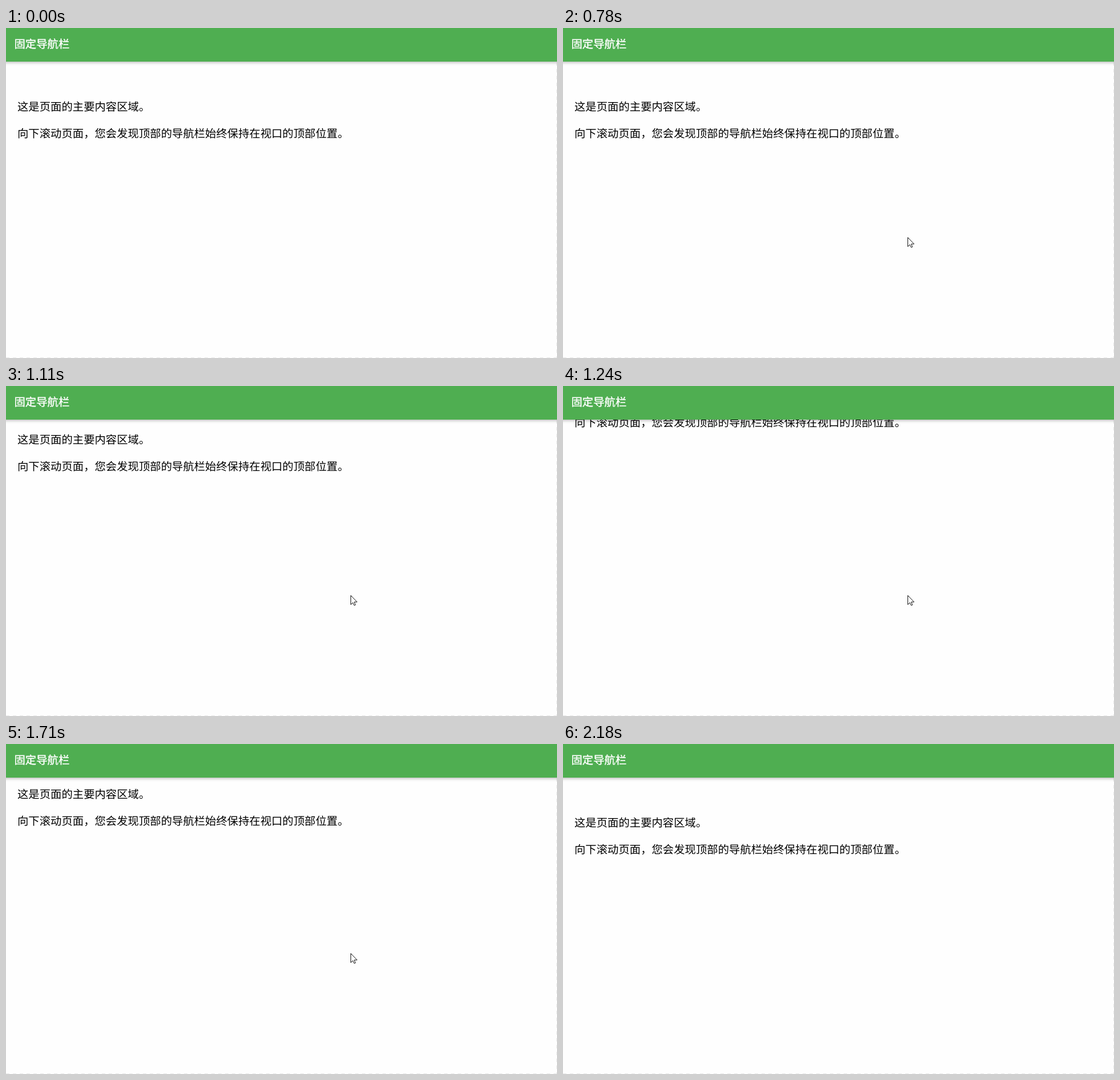
Recreate the animation shown at these times as an HTML page with a canvas. Size 966 by 579 pixels, loop 2840 ms.

```html
<!DOCTYPE html>
<html lang="zh-CN">
<head>
<meta charset="utf-8">
<title>固定导航栏</title>
<style>
  html, body { margin: 0; width: 100%; height: 100%; overflow: hidden; background: #fefefe; }
  canvas { display: block; }
</style>
</head>
<body>
<canvas id="stage" width="966" height="579"></canvas>
<script>
const W = 966, H = 579, LOOP = 2840, NAV_H = 59;
const SCROLL_MAX = 121, GAP = 70;
const ENTRY = { x: 653, y: 527 }, REST = { x: 604, y: 367 }, EXIT = { x: 660, y: 543 };
const FONT = '19.36px "Noto Sans CJK SC", "Noto Sans CJK", sans-serif';
const ARROW = new Path2D('M0 0V16L3.6 12.6L6 17.5L8.2 16.6L6 11.5H11Z');

const ctx = document.getElementById('stage').getContext('2d');
ctx.textRendering = 'geometricPrecision';

// Progress from 0 to 1 in equal jumps, the first one at `start`
function stepped(t, start, gap, count) {
  const step = Math.floor((t - start) / gap) + 1;
  return Math.min(Math.max(step, 0), count) / count;
}

function mix(a, b, p) {
  return { x: Math.round(a.x + (b.x - a.x) * p), y: Math.round(a.y + (b.y - a.y) * p) };
}

function scrollAt(t) {
  const down = stepped(t, 1040, 200 / 3, 4) ** 1.45;
  const up = stepped(t, 1640, GAP, 3) ** 1.33;
  return Math.round(SCROLL_MAX * (down - up));
}

function pointerAt(t) {
  if (t < 570 || t >= 2180) return null;
  if (t < 2040) {
    const p = stepped(t, 570 + GAP, GAP, 3);
    return mix(ENTRY, REST, 1 - (1 - p) ** 2);
  }
  return mix(REST, EXIT, stepped(t, 2040, GAP, 2) ** 1.5);
}

function text(str, x, y, color, bold = 0) {
  ctx.font = FONT;
  ctx.fillStyle = ctx.strokeStyle = color;
  ctx.fillText(str, x, y);
  if (bold) {
    ctx.lineWidth = bold;
    ctx.strokeText(str, x, y);
  }
}

function drawBorders() {
  ctx.strokeStyle = '#e9e9e9';
  ctx.lineWidth = 1;
  ctx.setLineDash([6, 6]);
  ctx.beginPath();
  ctx.moveTo(W - 0.5, 0);
  ctx.lineTo(W - 0.5, H);
  ctx.moveTo(0, H - 0.5);
  ctx.lineTo(W, H - 0.5);
  ctx.stroke();
  ctx.setLineDash([]);
}

function drawNav() {
  ctx.save();
  ctx.shadowColor = 'rgba(0,0,0,0.25)';
  ctx.shadowBlur = 5;
  ctx.shadowOffsetY = 2;
  ctx.fillStyle = '#4fae51';
  ctx.fillRect(-10, -10, W + 20, NAV_H + 10);
  ctx.restore();
  text('固定导航栏', 14.5, 35, '#fff', 0.4);
}

function drawPointer({ x, y }) {
  ctx.save();
  ctx.translate(x + 0.5, y + 0.5);
  ctx.fillStyle = '#fff';
  ctx.fill(ARROW);
  ctx.strokeStyle = '#111';
  ctx.lineWidth = 1;
  ctx.stroke(ARROW);
  ctx.restore();
}

function draw(t) {
  const scroll = scrollAt(t);
  const tip = pointerAt(t);
  ctx.fillStyle = '#fefefe';
  ctx.fillRect(0, 0, W, H);
  drawBorders();
  text('这是页面的主要内容区域。', 20, 145 - scroll, '#000');
  text('向下滚动页面\uff0c您会发现顶部的导航栏始终保持在视口的顶部位置。', 20, 192 - scroll, '#000');
  drawNav();
  if (tip) drawPointer(tip);
}

const begin = performance.now();
function tick() {
  draw((performance.now() - begin) % LOOP);
  requestAnimationFrame(tick);
}
tick();
</script>
</body>
</html>
```
